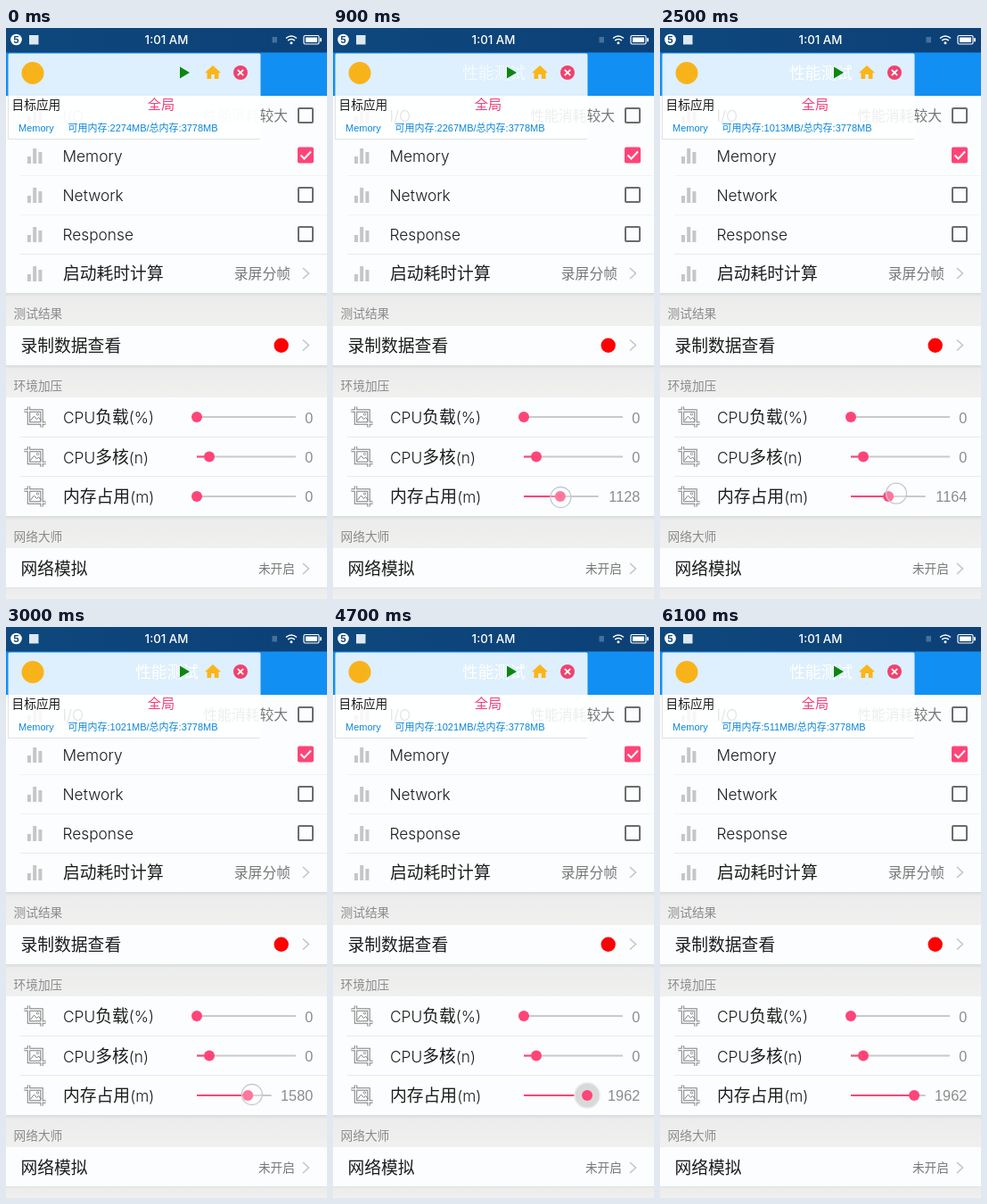
An HTML page that plays this animation: 360 px wide and 640 px high, repeating every 6300 ms.

```html
<!DOCTYPE html>
<html lang="zh-CN">
<head>
<meta charset="utf-8">
<title>性能测试</title>
<style>
  html, body { margin: 0; height: 100%; overflow: hidden; background: #efefef; }
  svg { display: block; width: 100%; height: 100%; }
  text { font-family: "Noto Sans CJK SC", "Noto Sans CJK", sans-serif; font-size: 18.8px; fill: #1c1c1c; }
  .lat { font-family: Inter, sans-serif; font-size: 17.3px; font-weight: 300; }
  .head { font-size: 13.7px; fill: #8b8b8b; }
  .side { font-size: 15.8px; fill: #777; text-anchor: end; }
  .num { font-family: "Liberation Sans", sans-serif; font-size: 16.3px; fill: #8c8c8c; text-anchor: end; }
  .mem { font-family: "Liberation Sans", "Noto Sans CJK SC", sans-serif; font-size: 11px; fill: #0a86d8; }
  .row { fill: #fbfdfe; }
  .line { stroke: #e9eaea; }
  .faint { stroke: #f2f4f4; }
  .track { stroke: #c9c9c9; stroke-width: 2; }
  .fill { stroke: #ff4477; stroke-width: 2; }
  .knob { fill: #ff4477; }
</style>
</head>
<body>
<svg viewBox="0 0 360 640" xmlns="http://www.w3.org/2000/svg">
  <defs>
    <linearGradient id="bar">
      <stop offset="0" stop-color="#0e487c"/><stop offset="1" stop-color="#0c4077"/>
    </linearGradient>
    <linearGradient id="band" x2="0" y2="1">
      <stop offset="0" stop-color="#d9dbdb"/><stop offset=".12" stop-color="#ececec"/><stop offset="1" stop-color="#f0f0ef"/>
    </linearGradient>
    <path id="bars" d="M24 1h4v8h-4zM30.2-8h4V9h-4zM36.4-4h4V9h-4z" fill="#c6c6c6"/>
    <rect id="box" x="328" y="-8" width="16" height="16" rx="1" fill="none" stroke="#6c6c6c" stroke-width="2"/>
    <path id="more" d="M333-6l6.500 6-6.500 6" fill="none" stroke="#c4c4c4" stroke-width="1.500"/>
    <path id="edges" d="M25.500-11.500V7H44.500M20.500-7H40V11.500"/>
    <g id="crop" fill="none">
      <use href="#edges" stroke="#7f7f7f" stroke-width="3.400"/>
      <use href="#edges" stroke="#fbfdfe" stroke-width="1.400"/>
      <path d="M27.500 4l4-5 3 3.500 2-2 3 3.500" stroke="#7f7f7f"/>
      <circle cx="35.500" cy="-3" r="1.200" stroke="#7f7f7f" stroke-width=".8"/>
    </g>
  </defs>

  <rect width="360" height="640" fill="#f0f0ef"/>

  <!-- list rows and section bands -->
  <rect class="row" y="76" width="360" height="221"/>
  <rect y="297" width="360" height="37" fill="url(#band)"/>
  <rect class="row" y="334" width="360" height="44"/>
  <rect y="378" width="360" height="36" fill="url(#band)"/>
  <rect class="row" y="414" width="360" height="133"/>
  <rect y="547" width="360" height="36" fill="url(#band)"/>
  <rect class="row" y="583" width="360" height="44"/>
  <rect y="627" width="360" height="13" fill="url(#band)"/>
  <path class="line" d="M16 253.500H360M16 458.500H360M16 502.500H360"/>
  <path class="faint" d="M16 165.500H360M16 209.500H360"/>

  <use href="#bars" y="98"/><use href="#bars" y="143"/><use href="#bars" y="187"/>
  <use href="#bars" y="231"/><use href="#bars" y="275"/>
  <g id="io">
    <text class="lat" x="63.500" y="104.500">I/O</text>
    <text class="side" x="284.400" y="103.500">性能消耗</text>
  </g>
  <text class="side" x="316" y="103.500">较大</text>
  <text class="lat" x="63.500" y="149.500">Memory</text>
  <text class="lat" x="63.500" y="193.500">Network</text>
  <text class="lat" x="63.500" y="237.500">Response</text>
  <text x="64" y="282">启动耗时计算</text>
  <use href="#box" y="98"/><use href="#box" y="187"/><use href="#box" y="231"/>
  <rect x="327" y="133.500" width="18" height="18" rx="2" fill="#ff4477"/>
  <path d="M330.500 142.500l4 4 7.500-8" fill="none" stroke="#fff" stroke-width="2"/>
  <text class="side" x="319" y="281">录屏分帧</text>
  <use href="#more" y="275"/>

  <text class="head" x="8.500" y="325">测试结果</text>
  <text x="16.500" y="362.500">录制数据查看</text>
  <circle cx="308.700" cy="355.700" r="8.200" fill="#f00"/>
  <use href="#more" y="355.500"/>

  <text class="head" x="8.500" y="405.700">环境加压</text>
  <use href="#crop" y="436"/><use href="#crop" y="480.500"/><use href="#crop" y="525"/>
  <text x="64" y="443"><tspan class="lat">CPU</tspan>负载<tspan class="lat">(%)</tspan></text>
  <text x="64" y="487.500"><tspan class="lat">CPU</tspan>多核<tspan class="lat">(n)</tspan></text>
  <text x="64" y="532">内存占用<tspan class="lat">(m)</tspan></text>

  <path class="track" d="M214 436H325M214 480.500H325"/>
  <path class="fill" d="M214 480.500H228"/>
  <circle class="knob" cx="214" cy="436" r="6"/>
  <circle class="knob" cx="228" cy="480.500" r="6"/>
  <text class="num" x="344.300" y="442.500">0</text>
  <text class="num" x="344.300" y="487">0</text>

  <line id="track" class="track" x1="214" x2="325" y1="525" y2="525"/>
  <line id="fill" class="fill" x1="214" x2="214" y1="525" y2="525"/>
  <circle id="halo" cy="525" r="14" fill="#d9d9d9" stroke="#e9e9e9" stroke-width="1.500"/>
  <circle id="knob" class="knob" cx="214" cy="525" r="6"/>
  <circle id="touch" cy="525" r="11.500" fill="#fff" fill-opacity=".28" stroke="#c3c8d2" stroke-width="1.300"/>
  <text id="load" class="num" x="344.300" y="531">0</text>

  <text class="head" x="8.500" y="574.700">网络大师</text>
  <text x="16.500" y="612.500">网络模拟</text>
  <text class="side" x="324" y="610.500" style="font-size:13.700px">未开启</text>
  <use href="#more" y="606"/>

  <!-- app bar and status bar -->
  <rect y="27" width="360" height="49" fill="#128ff2"/>
  <text id="title" x="180.500" y="57" text-anchor="middle" style="font-size:17.800px;fill:#fff">性能测试</text>
  <rect width="360" height="27.500" fill="url(#bar)"/>
  <circle cx="11.500" cy="13" r="6.300" fill="#fff"/>
  <text x="11.500" y="16.800" text-anchor="middle" style="font:700 10.500px Inter,sans-serif;fill:#0e467a">5</text>
  <rect x="26" y="8" width="10.500" height="10.500" fill="#dce8f2"/>
  <text x="180" y="18" text-anchor="middle" style="font:500 13.300px Inter,sans-serif;fill:#fff">1:01 AM</text>
  <rect x="298.500" y="10" width="5.500" height="6.500" fill="#47709a"/>
  <g fill="none" stroke="#fff" stroke-width="1.600">
    <path d="M314 11.500q6-5 12 0M316.200 14q3.800-3 7.600 0"/>
    <circle cx="320" cy="16.800" r=".7" fill="#fff"/>
    <rect x="334" y="8.500" width="17" height="9.500" rx="1.500" stroke-width="1.200"/>
    <path d="M353 11.300v4" stroke-width="1.800"/>
  </g>
  <rect x="336" y="10.500" width="13" height="5.500" fill="#fff"/>

  <!-- floating panel -->
  <rect x="2.500" y="28.500" width="283" height="96" rx="1.500" fill="#fff" fill-opacity=".86"/>
  <path d="M2.500 76V124.500H285" fill="none" stroke="#dadada" stroke-opacity=".8"/>
  <circle cx="30" cy="50.500" r="12.500" fill="#f9b31a"/>
  <path d="M195 43.500l11 6.500-11 6.500z" fill="#0b870f"/>
  <path d="M232 42l9 8.200h-2.500V57h-4.700v-5h-3.600v5h-4.700v-6.800H223z" fill="#fbb518"/>
  <circle cx="263" cy="50" r="8" fill="#f0426e"/>
  <path d="M259.800 46.800l6.400 6.400m0-6.400l-6.400 6.400" stroke="#fff" stroke-width="1.900"/>
  <text x="6.500" y="91" style="font-size:13.700px">目标应用</text>
  <text x="174" y="91" text-anchor="middle" style="font-size:15.200px;fill:#f2417f">全局</text>
  <text class="mem" x="14" y="116">Memory</text>
  <text id="free" class="mem" x="69.500" y="116"></text>
</svg>
<script>
  const LOOP = 6300, LEFT = 214, MAX = 2310;
  const el = id => document.getElementById(id);
  const [track, fill, halo, knob, touch, load, free, title, io] =
    ['track', 'fill', 'halo', 'knob', 'touch', 'load', 'free', 'title', 'io'].map(el);

  // [time, value] pairs
  const loads = [[0, 0], [200, 0], [700, 980], [900, 1128], [1100, 1164], [2500, 1164], [2700, 1230], [3300, 1930], [3500, 1962]];
  const touchX = [[2400, 265], [2600, 265], [3300, 284], [3500, 285]];
  const touchY = [[2400, 521], [2700, 523], [3300, 525]];
  const freeMem = [[0, 2274], [500, 2267], [1400, 1420], [2000, 1013], [2900, 1021], [5100, 742], [5500, 511]];
  const fade = [[0, 0], [300, .35], [700, .7], [1300, 1]];

  function lerp(keys, t) {
    const i = keys.findIndex(k => k[0] > t);
    if (i < 0) return keys[keys.length - 1][1];
    if (i === 0) return keys[0][1];
    const [t0, a] = keys[i - 1], [t1, b] = keys[i];
    return a + (b - a) * (t - t0) / (t1 - t0);
  }
  const step = (keys, t) => keys.filter(k => k[0] <= t).pop()[1];
  const within = (t, a, b) => t >= a && t < b;

  function set(node, attrs) {
    for (const name in attrs) node.setAttribute(name, attrs[name]);
  }

  function draw(t) {
    const value = Math.round(lerp(loads, t));
    const end = 325 - 9.1 * (String(value).length - 1);
    const x = LEFT + (end - LEFT) * value / MAX;
    const second = t >= 2400;
    load.textContent = value;
    set(track, { x2: end });
    set(fill, { x2: x });
    set(knob, { cx: x });
    set(halo, { cx: x, opacity: +within(t, 3300, 4900) });
    set(touch, {
      cx: second ? lerp(touchX, t) : x + .5,
      cy: second ? lerp(touchY, t) : 526,
      opacity: +(within(t, 200, 1200) || within(t, 2400, 3300))
    });
    free.textContent = `可用内存:${step(freeMem, t)}MB/总内存:3778MB`;
    set(title, { opacity: step(fade, t) });
    set(io, { opacity: t < 300 ? .25 : .9 });
  }

  const start = performance.now();
  function tick(now) {
    const t = Math.max(0, now - start) % LOOP;
    draw(Math.floor(t / 100) * 100);
    requestAnimationFrame(tick);
  }
  draw(0);
  requestAnimationFrame(tick);
</script>
</body>
</html>
```
